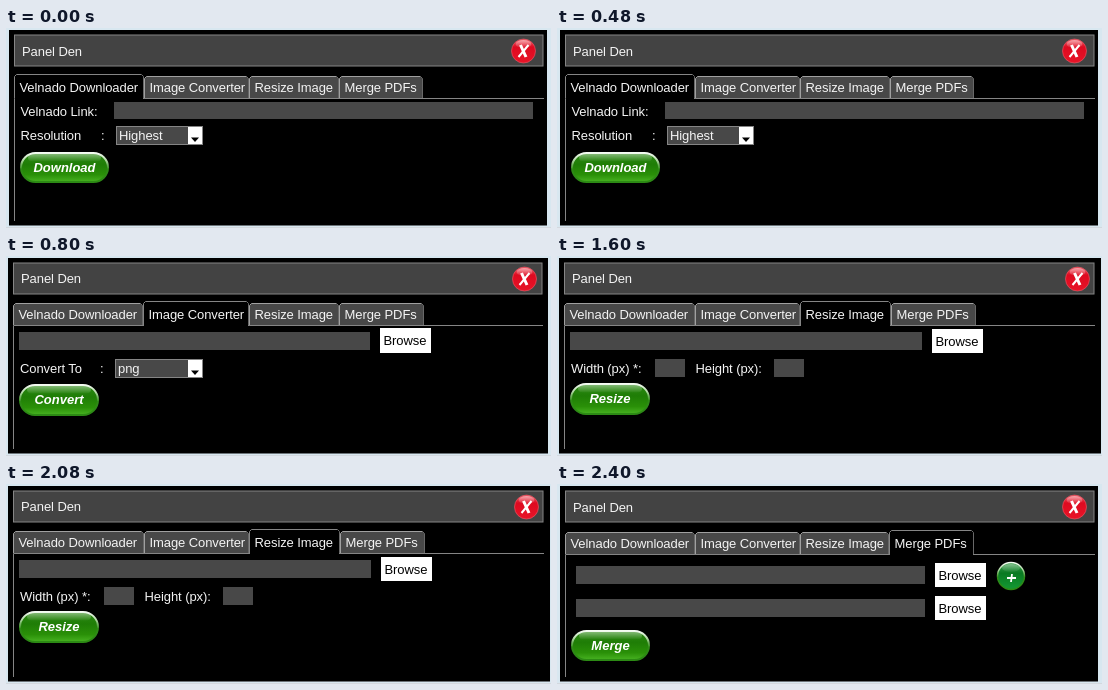
An HTML page that plays this animation: 545x200 px, repeating every 3200 ms.

```html
<!DOCTYPE html>
<html lang="en">
<head>
<meta charset="utf-8">
<title>Panel Den</title>
<style>
html, body { margin: 0; width: 100%; height: 100%; overflow: hidden; background: #d8e7f0; }
svg { display: block; width: 545px; height: 200px; }
text { font: 13px "Liberation Sans", Arial, sans-serif; letter-spacing: -.08px; fill: #f4f4f4; white-space: pre; }
.cta { font-weight: bold; font-style: italic; letter-spacing: 0; text-anchor: middle; fill: #fff; }
.ink { fill: #000; }
.scene { visibility: hidden; animation: show 3200ms step-end infinite; }
@keyframes show { 0% { visibility: visible; } 25%, 100% { visibility: hidden; } }
</style>
</head>
<body>
<svg id="stage" viewBox="0 0 545 200" xmlns="http://www.w3.org/2000/svg">
  <defs>
    <linearGradient id="green" x2="0" y2="1">
      <stop offset="0" stop-color="#2c8a14"/>
      <stop offset=".4" stop-color="#1f7d06"/>
      <stop offset=".75" stop-color="#2a9008"/>
      <stop offset="1" stop-color="#48b322"/>
    </linearGradient>
    <linearGradient id="rim" x2="0" y2="1">
      <stop offset="0" stop-color="#f4fbf2"/>
      <stop offset=".25" stop-color="#b4dba8"/>
      <stop offset=".55" stop-color="#2f8a18"/>
      <stop offset="1" stop-color="#2c8a14"/>
    </linearGradient>
    <linearGradient id="gloss" x2="0" y2="1">
      <stop offset="0" stop-color="#fff" stop-opacity=".75"/>
      <stop offset="1" stop-color="#fff" stop-opacity=".05"/>
    </linearGradient>
    <linearGradient id="red" x2="0" y2="1">
      <stop offset="0" stop-color="#ee4a58"/>
      <stop offset=".35" stop-color="#de0a20"/>
      <stop offset="1" stop-color="#e81428"/>
    </linearGradient>
    <linearGradient id="plus" x2="0" y2="1">
      <stop offset="0" stop-color="#3f9f50"/>
      <stop offset=".4" stop-color="#0a7a22"/>
      <stop offset="1" stop-color="#149a34"/>
    </linearGradient>
  </defs>
</svg>
<script>
const GREY = '#484848', LIGHT = '#a0a0a0', DIM = '#858585';
const TABS = ['Velnado Downloader', 'Image Converter', 'Resize Image', 'Merge PDFs'];

const rect = (x, y, r, b, fill, extra = '') =>
  `<rect x="${x}" y="${y}" width="${r - x}" height="${b - y}" fill="${fill}" ${extra}/>`;
const text = (x, y, s, cls = '') => `<text x="${x}" y="${y}" class="${cls}">${s}</text>`;
const line = (d, color = LIGHT) => `<path d="${d}" fill="none" stroke="${color}"/>`;
const field = (x, y, r, b) => rect(x, y, r, b, GREY);
const browse = (x, y, r, b) => rect(x, y, r, b, '#fff') + text(x + 3.5, y + 17, 'Browse', 'ink');

function tab(x, r, bottom, label, active) {
  const top = bottom - (active ? 24 : 22) + .5, l = x + .5, e = r - .5;
  return `<path d="M${l} ${bottom}V${top + 2}l2 -2H${e - 2}l2 2V${bottom}z" fill="${active ? '#000' : GREY}"/>` +
    line(`M${l} ${bottom}V${top + 2}l2 -2H${e - 2}`, active ? DIM : LIGHT) +
    line(`M${e - 2} ${top}l2 2V${bottom}`, '#686868') +
    text(x + 5.5, bottom - 6, label);
}

function closeButton(x, y) {
  return `<circle cx="${x}" cy="${y}" r="12" fill="url(#red)" stroke="#e8606c" stroke-width=".6"/>` +
    `<ellipse cx="${x}" cy="${y - 7}" rx="8" ry="4" fill="url(#gloss)" opacity=".7"/>` +
    `<path d="M${x - 3} ${y - 6}l5.5 12" stroke="#fff" stroke-width="3"/>` +
    `<path d="M${x + 5} ${y - 6}l-10 12" stroke="#fff" stroke-width="2"/>`;
}

function pill(x, y, r, b, label) {
  const h = b - y;
  return rect(x + 1, y + 1, r - 1, b - 1, 'url(#green)', `rx="${h / 2 - 1}" stroke="url(#rim)" stroke-width="2"`) +
    rect(x + 8, y + 2, r - 8, y + h * .3, 'url(#gloss)', `rx="${h * .14}" opacity=".55"`) +
    text((x + r) / 2, y + 20.3, label, 'cta');
}

function combo(x, y, r, value) {
  const b = y + 19;
  return rect(x + .5, y + .5, r - .5, b - .5, GREY, `stroke="${DIM}"`) +
    rect(r - 15, y + 1, r - 1, b - 1, '#fff') +
    `<path d="M${r - 12} ${y + 11.5}h8l-4 4.5z" fill="#000"/>` +
    text(x + 3, y + 14, value);
}

function plusButton(x, y) {
  return `<circle cx="${x}" cy="${y}" r="13.5" fill="url(#plus)" stroke="url(#rim)" stroke-width="1.5"/>` +
    `<ellipse cx="${x}" cy="${y - 8}" rx="9" ry="4" fill="url(#gloss)" opacity=".5"/>` +
    `<path d="M${x - 4} ${y + 2}h9M${x + 1} ${y - 2}l-1 8" stroke="#fff" stroke-width="1.8"/>`;
}

// edges: left side of each tab, then the right side of the last
function chrome(active, left, right, bottom, edges, closeX) {
  const y = bottom + .5, l = left + .5;
  return rect(left - 5, 2, closeX + 24, 197.5, '#000') +
    rect(l, 7, right - 1, 38, '#434343', `stroke="${DIM}"`) +
    text(left + 8, bottom - 42, 'Panel Den') +
    closeButton(closeX + .5, 23) +
    TABS.map((t, i) => tab(edges[i], edges[i + 1], bottom, t, i === active)).join('') +
    line(`M${l} 193V${y}H${edges[active] + 1}M${edges[active + 1] - 1} ${y}H${right}`, DIM);
}

const scenes = [
  chrome(0, 8, 538, 70, [8, 138, 243, 333, 417], 517) +
    text(14.5, 87.5, 'Velnado Link:') + field(108, 74, 527, 91) +
    text(14.5, 112, 'Resolution') + text(95, 112, ':') + combo(110, 98, 197, 'Highest') +
    pill(14, 124, 103, 155, 'Download'),
  chrome(1, 7, 537, 69, [7, 137, 243, 333, 418], 518) +
    field(13, 76, 364, 94) + browse(374, 72, 425, 97) +
    text(14, 117, 'Convert To') + text(94, 117, ':') + combo(109, 103, 197, 'png') +
    pill(13, 128, 93, 160, 'Convert'),
  chrome(2, 7, 538, 69, [7, 138, 243, 334, 419], 520) +
    field(13, 76, 365, 94) + browse(375, 73, 426, 97) +
    text(14, 117, 'Width (px) *:') + field(98, 103, 128, 121) +
    text(138.5, 117, 'Height (px):') + field(217, 103, 247, 121) +
    pill(13, 127, 93, 159, 'Resize'),
  chrome(3, 8, 538, 70, [8, 138, 243, 332, 417], 517) +
    field(19, 82, 368, 100) + browse(378, 79, 429, 103) + plusButton(454, 92) +
    field(19, 115, 368, 133) + browse(378, 112, 429, 136) +
    pill(14, 146, 93, 177, 'Merge')
];

document.getElementById('stage').insertAdjacentHTML('beforeend',
  rect(0, 199, 545, 200, '#d3d8de') +
  scenes.map((s, i) => `<g class="scene" style="animation-delay:${i ? i * 800 - 3200 : 0}ms">${s}</g>`).join(''));
</script>
</body>
</html>
```
